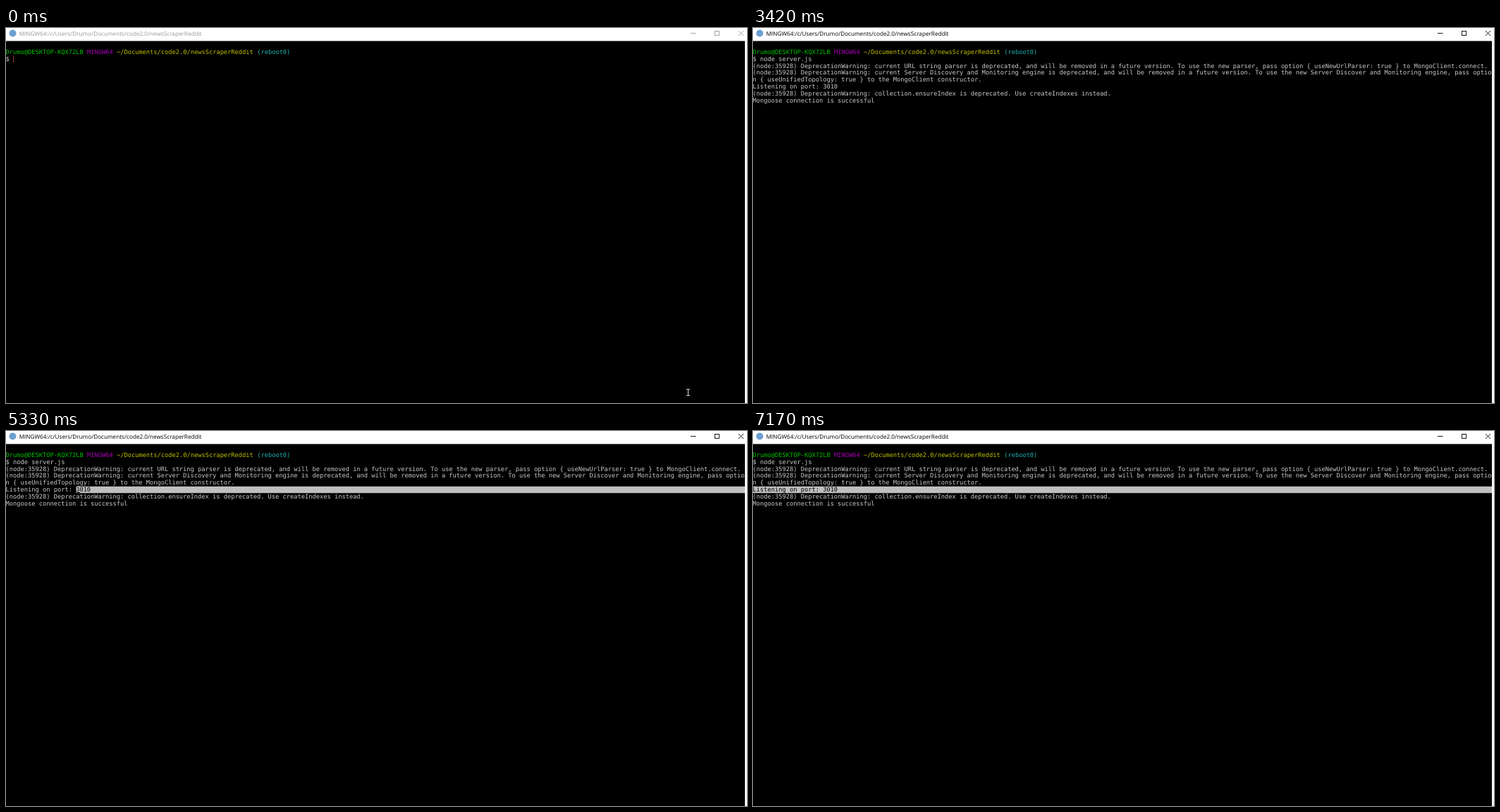
An HTML page with a canvas that plays this animation: 1051 by 533 pixels, repeating every 8000 ms.

```html
<!DOCTYPE html>
<html lang="en">
<head>
<meta charset="utf-8">
<title>Terminal</title>
<style>
html, body { margin: 0; width: 100%; height: 100%; overflow: hidden; background: #000; }
canvas { display: block; }
</style>
</head>
<body>
<canvas id="stage" width="1051" height="533"></canvas>
<script>
const ctx = document.getElementById('stage').getContext('2d');
const W = 1051, H = 533, LOOP = 8000;
const CELL = 5.244, ROW = 9.87, TOP = 29.2, LEFT = -0.4, RIGHT = 1048;
const TEXT = '#cacaca', FILL = '#bfbfbf';
const MONO = '8.71px "DejaVu Sans Mono", monospace';
const SANS = '8.2px "Open Sans", sans-serif';

const TITLE = 'MINGW64:/c/Users/Drumo/Documents/code2.0/newsScraperReddit';
const PROMPT = [
  ['Drumo@DESKTOP-KQX72LB', '#00bf00'],
  ['MINGW64', '#a800b4'],
  ['~/Documents/code2.0/newsScraperReddit', '#bfbf00'],
  ['(reboot0)', '#20b2b2']
];
const WARN = '(node:35928) DeprecationWarning: ';
const LISTEN = 'Listening on port: 3010';
const OUTPUT = [
  WARN + 'current URL string parser is deprecated, and will be removed in a future version. To use the new parser, pass option { useNewUrlParser: true } to MongoClient.connect.',
  WARN + 'current Server Discovery and Monitoring engine is deprecated, and will be removed in a future version. To use the new Server Discover and Monitoring engine, pass optio',
  'n { useUnifiedTopology: true } to the MongoClient constructor.',
  LISTEN,
  WARN + 'collection.ensureIndex is deprecated. Use createIndexes instead.',
  'Mongoose connection is successful'
];
const LISTEN_ROW = 2 + OUTPUT.indexOf(LISTEN);

// Typing bursts; the last one is pasted in at once by tab completion.
const BURSTS = [
  { text: 'node', start: 780, gap: 100 },
  { text: ' serv', start: 1250, gap: 95 },
  { text: 'er.js ', start: 1940, gap: 0 }
];
const FOCUS_AT = 70, BLINK_AT = 300, ENTER_AT = 2410, OUTPUT_AT = 3420;

const linear = p => p;
const easeIn = p => p * p;
const easeOut = p => p * (2 - p);

// Pointer glides along quadratic curves, sampled every STEP ms.
const STEP = 76;
const GLIDES = [
  { start: 4350, steps: 10, ease: linear, curve: [[381, 70], [-80, 35], [126, 83]] },
  { start: 5230, steps: 10, ease: easeOut, curve: [[126, 83], [63.5, 83], [1, 83]] },
  { start: 6160, steps: 5, ease: easeIn, curve: [[3.5, 83], [103.5, 161], [203.5, 239]] },
  { start: 6780, steps: 4, ease: easeOut, curve: [[203.5, 239], [250, 520], [233, 517]] }
];
const SELECT_AT = GLIDES[1].start + STEP;
const SELECT_END = GLIDES[1].start + STEP * GLIDES[1].steps;
const LEAVE_AT = 7170;

const colX = col => LEFT + col * CELL;
const rowY = row => TOP + row * ROW;

function rect(x, y, w, h, color) {
  ctx.fillStyle = color;
  ctx.fillRect(x, y, w, h);
}

function line(x1, y1, x2, y2) {
  ctx.moveTo(x1, y1);
  ctx.lineTo(x2, y2);
}

function write(text, row, col, color) {
  ctx.fillStyle = color;
  ctx.fillText(text, colX(col), rowY(row) + 7.6);
}

function typedAt(t) {
  return BURSTS.filter(b => t >= b.start).map(({ text, start, gap }) =>
    gap ? text.slice(0, 1 + Math.floor((t - start) / gap)) : text).join('');
}

function pointerAt(t) {
  if (t < FOCUS_AT) return [967.5, 518];
  if (t < BURSTS[0].start) return [373.5, 73];
  if (t < GLIDES[0].start || t >= LEAVE_AT) return null;
  const { start, steps, ease, curve: [a, b, c] } = GLIDES.filter(g => g.start <= t).pop();
  const p = ease(Math.min(1, Math.floor((t - start) / STEP) / steps)), q = 1 - p;
  return a.map((v, i) => q * q * v + 2 * p * q * b[i] + p * p * c[i]);
}

function drawTitleBar(active) {
  rect(0, 0, W, 18.5, '#fff');
  ctx.fillStyle = '#6d9fd0';
  ctx.beginPath();
  ctx.arc(9.5, 7.5, 5, 0, Math.PI * 2);
  ctx.fill();

  const ink = active ? '#000' : '#999';
  ctx.font = SANS;
  ctx.fillStyle = ink;
  ctx.fillText(TITLE, 18.7, 11);

  ctx.strokeStyle = ink;
  ctx.lineWidth = 0.9;
  ctx.strokeRect(1005.5, 4.5, 6, 6);
  ctx.beginPath();
  line(971, 7.5, 978.5, 7.5);
  line(1039, 4, 1046, 11);
  line(1046, 4, 1039, 11);
  ctx.stroke();
}

function drawPrompt() {
  let col = 0;
  for (const [text, color] of PROMPT) {
    write(text, 0, col, color);
    col += text.length + 1;
  }
}

function drawCaret(t, col) {
  if (t >= ENTER_AT || (t >= BLINK_AT && t < BURSTS[0].start)) return;
  rect(Math.floor(colX(col)), 39, 1, 10, t < FOCUS_AT ? '#a03030' : FILL);
}

function drawSelection(x) {
  const left = Math.max(0, colX(Math.floor(x / CELL))), y = rowY(LISTEN_ROW);
  ctx.save();
  ctx.beginPath();
  ctx.rect(left, y, RIGHT - left, ROW);
  ctx.clip();
  rect(left, y, RIGHT - left, ROW, FILL);
  write(LISTEN, LISTEN_ROW, 0, '#000');
  ctx.restore();
}

// The I-beam inverts whatever lies below it.
function drawPointer([x, y]) {
  ctx.save();
  ctx.globalCompositeOperation = 'difference';
  ctx.translate(Math.round(x - 0.5), Math.round(y));
  rect(0, -4, 1, 8, '#e0e0e0');
  rect(-2, -5, 5, 1, '#c8c8c8');
  rect(-2, 4, 5, 1, '#c8c8c8');
  ctx.restore();
}

function draw(t) {
  rect(0, 0, W, H, '#000');
  rect(RIGHT, 18, W - RIGHT, H - 18, '#f8f8f8');
  drawTitleBar(t >= FOCUS_AT);

  ctx.font = MONO;
  drawPrompt();
  const command = '$ ' + typedAt(t);
  write(command, 1, 0, TEXT);
  drawCaret(t, command.length);
  if (t >= OUTPUT_AT) OUTPUT.forEach((text, i) => write(text, i + 2, 0, TEXT));

  const pointer = pointerAt(t);
  if (t >= SELECT_AT) drawSelection(t < SELECT_END ? pointer[0] : 0);
  if (pointer) drawPointer(pointer);
}

ctx.textRendering = 'geometricPrecision';
const begin = performance.now();
function tick() {
  draw((performance.now() - begin) % LOOP);
  requestAnimationFrame(tick);
}
tick();
</script>
</body>
</html>
```
